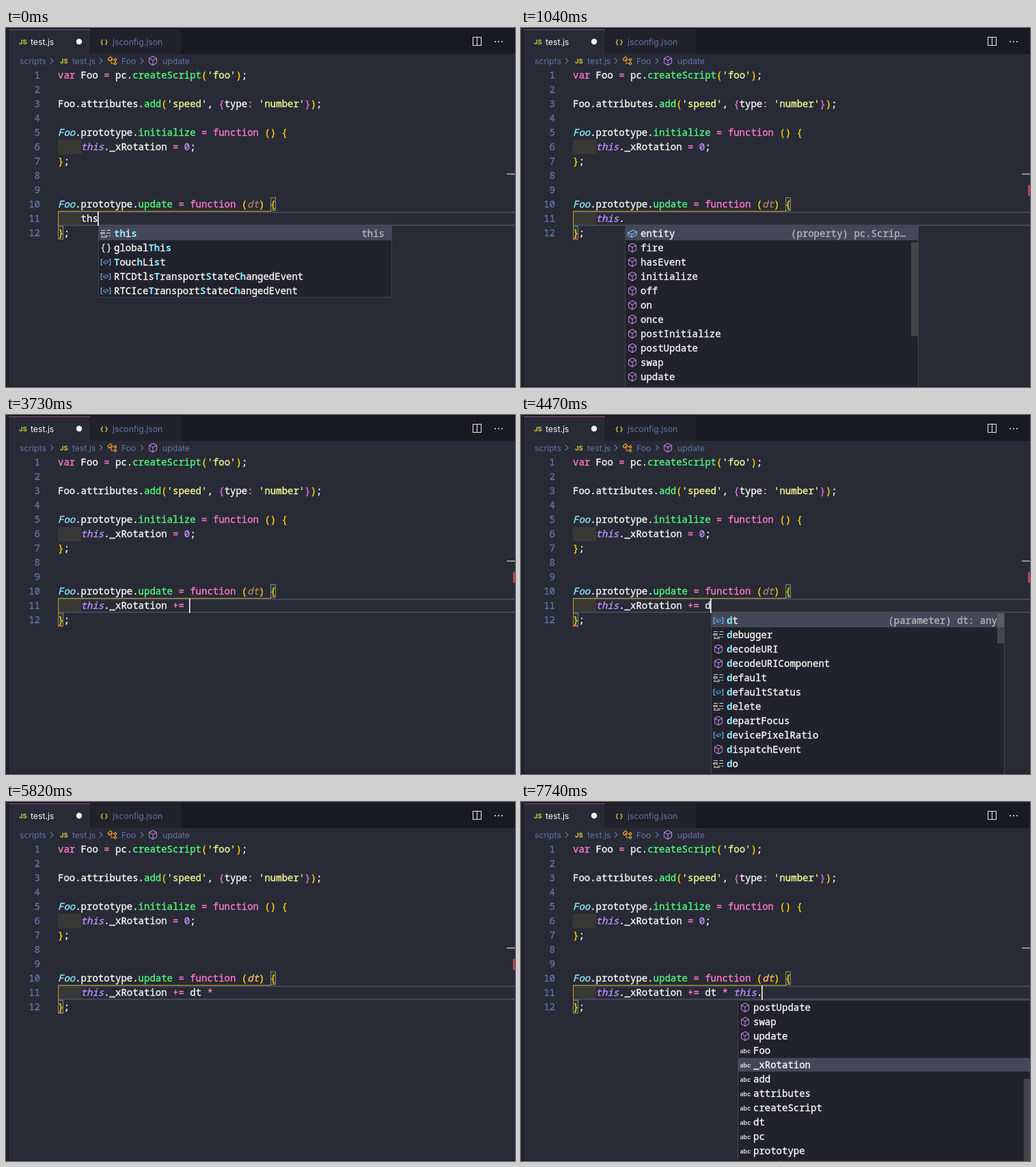
Write an HTML page that moves like this. It is 745 by 526 pixels and loops after 8000 ms.

```html
<!DOCTYPE html>
<html lang="en">
<head>
<meta charset="utf-8">
<title>Code editor</title>
<style>
html, body { margin: 0; width: 100%; height: 100%; overflow: hidden; background: #282a36; }
svg { display: block; width: 745px; height: 526px; color: #f8f8f2; }
text { white-space: pre; font: 500 14px "Noto Sans Mono", "DejaVu Sans Mono", monospace; font-variant-ligatures: none; stroke-width: .35px; }
text, tspan { fill: currentColor; stroke: currentColor; }
.ui { font: 400 12.2px Inter, "Liberation Sans", sans-serif; stroke-width: 0; }
.js { font: 700 9.5px Inter, sans-serif; color: #cbcb41; stroke-width: 0; }
.abc { font: 500 9px Inter, sans-serif; stroke-width: 0; }
.num { color: #6272a4; text-anchor: end; }
.detail { color: #b4b5ba; text-anchor: end; }
.p { color: #ff79c6; } .g { color: #50fa7b; } .s { color: #f1fa8c; }
.c { color: #8be9fd; font-style: italic; }
.v { color: #bd93f9; } .V { color: #bd93f9; font-style: italic; }
.y { color: #ffd700; } .o { color: #da70d6; }
.d { color: #ffb86c; font-style: italic; }
.unused { color: #ab8162; font-style: italic; }
.hit { color: #8be9fd; font-weight: 700; stroke-width: 0; }
path { fill: none; stroke-width: 1.1; stroke-linejoin: round; }
</style>
</head>
<body>
<svg viewBox="0 0 745 526"><g id="base"></g><g id="live"></g></svg>
<script>
const CHAR = 8.4, LEFT = 76, ROW = 21, VISIBLE = 12, LOOP = 8000;
const rect = (x, y, w, h, fill, more = '') =>
  `<rect x="${x}" y="${y}" width="${w}" height="${h}" fill="${fill}" ${more}/>`;
const text = (x, y, s, cls = '', color = '') =>
  `<text x="${x}" y="${y}" class="${cls}" ${color && `style="color:${color}"`}>${s}</text>`;
const path = (x, y, d, color, scale = 1) =>
  `<path transform="translate(${x} ${y}) scale(${scale})" d="${d}" stroke="${color}"/>`;

// "^x" starts a run of class x
const paint = s => s.split('^').slice(1)
  .map(r => `<tspan class="${r[0]}">${r.slice(1)}</tspan>`).join('');
const codeLine = (n, s) => text(LEFT, 53 + ROW * n, paint(s));

const CUBE = 'M0-6.5L5.5-3.5V3.2L0 6.5-5.5 3.2V-3.5zM-5.5-3.5L0-.4 5.5-3.5M0-.4V6.5';
const BRICK = 'M-6.5-1L1-4.7 6.5-2.2V1.8L-1 5.5-6.5 2.8zM-6.5-1L-1 1.4 6.5-2.2M-1 1.4V5.5';
const icons = {
  m: (x, y) => path(x, y, CUBE, '#b180d7'),
  f: (x, y) => path(x, y, BRICK, '#75beff'),
  v: (x, y) => path(x, y, 'M-4.5-4H-6.7V4.5H-4.5M4.5-4H6.7V4.5H4.5', '#75beff') +
    path(x, y, BRICK, '#75beff', .55),
  k: (x, y) => path(x, y, 'M-7-4.5h6M1.5-4.5h5.5M-7-1.5h5v2h-5zM1-.5h6M-7 3.5h3M-2 3.5h5M4.5 3.5h2.5M-7 5.5h9', '#d7d7d7'),
  n: (x, y) => text(x - 8, y + 4, '{}', '', '#d7d7d7'),
  t: (x, y) => text(x - 7.5, y + 3.5, 'abc', 'abc')
};

const events = ['v RTCDtls*T*ransport*S*tateC*h*angedEvent', 'v RTCIce*T*ransport*S*tateC*h*angedEvent'];
const members = ('f app,f enabled,f entity,m fire,m hasEvent,m initialize,m off,m on,m once,' +
  'm postInitialize,m postUpdate,m swap,m update,t Foo,t _xRotation,t add,t attributes,' +
  't createScript,t dt,t pc,t prototype,t speed').split(',');
const lists = {
  ths: { rows: ['k *th*i*s*', 'n global*Th*i*s*', 'v *T*ouc*h*Li*s*t', ...events], detail: 'this' },
  thsi: { rows: ['k *this*', 'n global*This*', 'v *T*ouc*h*L*is*t'], detail: 'this' },
  members: { rows: members, first: 2, sel: 2, detail: '(property) pc.Scrip…' },
  wrapped: { rows: members, first: 10, sel: 19 },
  chosen: { rows: members, first: 10, sel: 14 },
  own: { rows: ['t *_*xRotation'] },
  d: {
    rows: 'v dt,k debugger,m decodeURI,m decodeURIComponent,k default,v defaultStatus,k delete,m departFocus,v devicePixelRatio,m dispatchEvent,k do,v document'
      .split(',').map(r => r.replace(' d', ' *d*')),
    total: 69, detail: '(parameter) dt: any'
  },
  dt: {
    rows: ['v *dt*', 'm *d*ecodeURIComponen*t*', 'k *d*efaul*t*', 'v *d*efaultS*t*atus', 'k *d*ele*t*e',
      'm *d*epar*t*Focus', 'v *d*evicePixelRa*t*io', 'm *d*ispa*t*chEvent'],
    detail: '(parameter) dt: any'
  }
};

// time, typed text, flags (c: caret, e: error mark), suggestion list
const X = 'this._xRotation', D = X + ' += dt';
const steps = [
  [0, 'ths', 'c', 'ths'],
  [300, 'thsi', 'c', 'thsi'],
  [440, 'this', 'c'],
  [590, 'this.', 'c', 'members'],
  [890, 'this.', 'ce', 'members'],
  [1040, 'this.', 'e', 'members'],
  [1190, 'this._', 'ce', 'own'],
  [1630, 'this._', '', 'own'],
  [1780, X, 'c'],
  [2230, X + ' ', 'c'],
  [2680, X + ' ', ''],
  [2980, X + ' +', 'c'],
  [3280, X + ' +=', 'c'],
  [3430, X + ' +=', 'ce'],
  [3730, X + ' += ', 'ce'],
  [4180, X + ' += ', 'e'],
  [4320, X + ' += d', 'ce'],
  [4470, X + ' += d', 'ce', 'd'],
  [4620, D, 'ce', 'dt'],
  [4920, D + ' ', 'c'],
  [5220, D + ' *', 'c'],
  [5370, D + ' * ', 'c'],
  [5820, D + ' * ', 'e'],
  [6410, D + ' * t', 'ce'],
  [6560, D + ' * ths', 'ce', 'ths'],
  [6710, D + ' * thsi', 'ce', 'thsi'],
  [7000, D + ' * thsi', 'c', 'thsi'],
  [7150, D + ' * thsi', '', 'thsi'],
  [7300, D + ' * this', 'c'],
  [7440, D + ' * this.', 'c', 'members'],
  [7590, D + ' * this.', 'c', 'wrapped'],
  [7740, D + ' * this.', 'c', 'chosen']
];

function popup(caretX, { rows, first = 0, sel = 0, detail = '', total = rows.length }) {
  const x = Math.min(317, Math.round(caretX)), top = 290;
  const shown = rows.slice(first, first + VISIBLE);
  const full = VISIBLE * ROW, height = shown.length * ROW;
  let out = rect(x, top, 430, height, '#21222c');
  out += rect(x, top + 1 + (sel - first) * ROW, 430, ROW - 1, '#44475a');
  shown.forEach((r, i) => {
    const y = top + 11 + i * ROW;
    const label = r.slice(2).split('*').map((p, j) => j % 2 ? `<tspan class="hit">${p}</tspan>` : p).join('');
    out += icons[r[0]](x + 11, y) + text(x + 23, y + 5, label);
  });
  if (detail) out += text(x + (rows === members ? 411 : 419), top + 16, detail, 'detail');
  if (total > VISIBLE) out += rect(x + 419, top + 1 + first * full / total, 11, full * VISIBLE / total, 'rgba(121,121,121,.4)');
  return out + rect(x + .5, top + .5, 429, height - 1, 'none', 'stroke="#454545"');
}

function drawBase() {
  const blue = '#6272a4', gap = 'M-2-4L2 0-2 4';
  let out = rect(0, 0, 745, 526, '#282a36') + rect(0, 0, 745, 38, '#191a21') +
    rect(4, 2, 119, 36, '#282a36') + rect(4, 2, 119, 1, '#94527e') + rect(124, 2, 132, 36, '#21222c') +
    rect(0, 0, 3, 526, '#21222c') + rect(3, 0, 1, 526, '#191a21') + rect(0, 525, 745, 1, '#191a21');
  out += text(19, 23.5, 'JS', 'js') + text(36, 24.5, 'test.js', 'ui') +
    '<circle cx="107" cy="20" r="4.2" fill="#f8f8f2"/>' +
    text(138, 24, '{ }', 'js') + text(156, 24.5, 'jsconfig.json', 'ui', blue);
  out += path(689.5, 19.5, 'M-6-6H6V6H-6zM0-6V6', '#e4e4e4') +
    [716, 721, 726].map(x => `<circle cx="${x}" cy="20" r="1.1" fill="#e4e4e4"/>`).join('');
  out += [[20, 'scripts'], [97, 'test.js'], [169, 'Foo'], [229, 'update']]
    .map(([x, s]) => text(x, 52.5, s, 'ui', blue)).join('');
  out += [67, 139, 199].map(x => path(x, 48, gap, blue)).join('') + text(79, 51.5, 'JS', 'js') +
    path(155.5, 48, 'M-6.5-2L-2.5-6 0-3.5-4 .5zM-1.5-1.5H3M-1.5-1.5V4H3M4.5-3.5L6.5-1.5 4.5.5 2.5-1.5zM4.5 2L6.5 4 4.5 6 2.5 4z', '#ee9d28') +
    path(215, 48, CUBE, '#b180d7');
  for (let n = 1; n <= 12; n++) out += text(50, 53 + ROW * n, n, 'num');
  out += rect(76, 164, 34, 21, '#383935') + rect(76, 269, 34, 21, '#383935') +
    rect(76, 269, 669, 2, '#44475a') + rect(76, 288, 669, 2, '#44475a') +
    rect(76, 268, 312, 1, '#bda21a') + rect(76, 268, 1, 22, '#bda21a') +
    [[387.5, 248.5], [76.5, 290.5]].map(([x, y]) =>
      rect(x, y, 7, 19, '#2c3832', 'stroke="#85867f"')).join('') +
    rect(733, 213, 12, 2, '#919298');
  out += codeLine(1, "^pvar^w Foo ^p=^w pc.^gcreateScript^y(^s'foo'^y)^w;") +
    codeLine(3, "^wFoo.attributes.^gadd^y(^s'speed'^w, ^o{^wtype^p: ^s'number'^o}^y)^w;") +
    codeLine(5, '^cFoo^w.prototype.^ginitialize ^p= function ^y() {') +
    codeLine(6, '^w    ^Vthis^w._xRotation ^p= ^v0^w;') +
    codeLine(7, '^y}^w;') + codeLine(12, '^y}^w;');
  document.getElementById('base').innerHTML = out;
}

function drawStep([time, typed, flags, list]) {
  const caretX = LEFT + CHAR * (typed.length + 4);
  const marked = typed.replace(/[+*]?=|[+*]/g, '^p$&^w').replace(/\bthis\b/g, '^Vthis^w');
  const arg = time < 4920 ? '<tspan class="unused">dt</tspan>' : 'dt';
  let out = codeLine(10, `^cFoo^w.prototype.^gupdate ^p= function ^y(^d${arg}^y) {`) +
    codeLine(11, '^w    ' + marked);
  if (flags.includes('e')) out += rect(742, 230, 3, 16, '#b4444c') +
    path(80, 308.5, 'M-3.5 1.5L-.5-1.2 2 1.5 3.5 0', '#ff5555');
  if (flags.includes('c')) out += rect(Math.round(caretX) - 1, 269, 1.6, 21, '#f8f8f2');
  if (list) out += popup(caretX, lists[list]);
  document.getElementById('live').innerHTML = out;
}

let current;
function frame() {
  const t = performance.now() % LOOP;
  const step = steps.findLast(s => s[0] <= t);
  if (step !== current) drawStep(current = step);
  requestAnimationFrame(frame);
}
drawBase();
frame();
</script>
</body>
</html>
```
